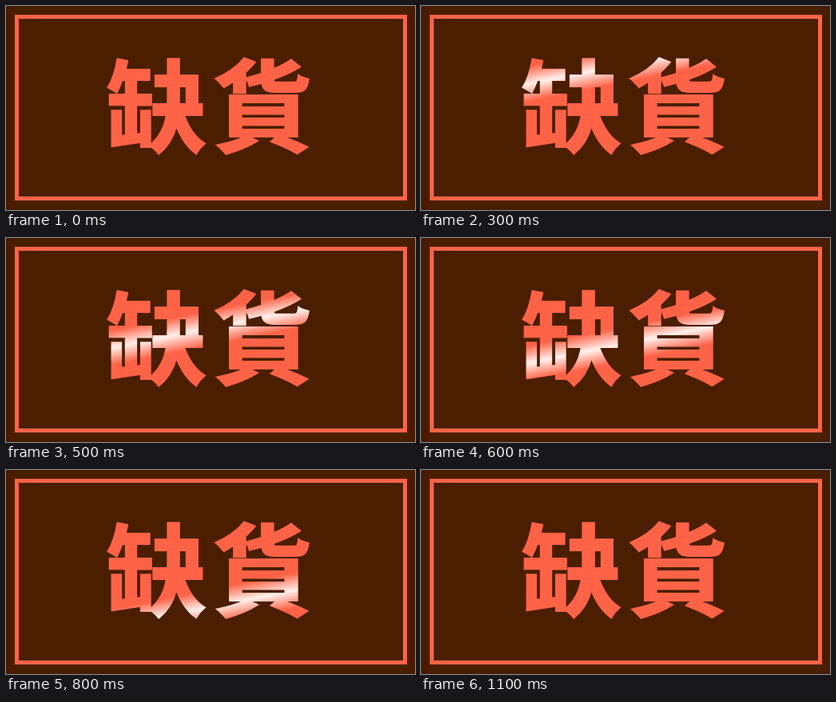
Recreate the animation shown at these times as an HTML page. Size 512 px wide and 256 px high, loop 1200 ms.

```html
<!DOCTYPE html>
<html lang="zh">
<head>
<meta charset="utf-8">
<style>
  html, body { margin: 0; width: 100%; height: 100%; overflow: hidden; background: #4b1e00; }
  svg { display: block; width: 512px; height: 256px; }
  .edge { position: absolute; top: 0; left: 0; width: 512px; height: 256px; box-shadow: inset 0 0 6px #401900; }
  text {
    font: 700 126px "Noto Sans CJK SC", "Noto Sans CJK TC", "Noto Sans CJK JP", sans-serif;
    text-anchor: middle;
    fill: url(#shine);
    stroke: url(#shine);
    stroke-width: 2px;
  }
</style>
</head>
<body>
<div class="edge"></div>
<svg viewBox="0 0 512 256">
  <defs>
    <linearGradient id="shine" gradientUnits="userSpaceOnUse" x1="-4.23" y1="-21.15" x2="4.23" y2="21.15">
      <stop offset="0" stop-color="#ff6347"/>
      <stop offset=".5" stop-color="#fff0ec"/>
      <stop offset="1" stop-color="#ff6347"/>
    </linearGradient>
  </defs>
  <rect x="13.5" y="13.5" width="486" height="228" fill="none" stroke="#ff6347" stroke-width="5"/>
  <text x="188 321.5" y="173.5">缺貨</text>
</svg>
<script>
  const LOOP = 1200, STEP = 100;
  const shine = document.getElementById('shine');
  const start = performance.now();

  // The tilted highlight slides down the lettering in discrete steps.
  function draw() {
    const time = Math.max(0, performance.now() - start) % LOOP;
    const step = Math.floor(time / STEP);
    shine.setAttribute('gradientTransform', `translate(0 ${65.6 + 19.7 * step})`);
    requestAnimationFrame(draw);
  }
  draw();
</script>
</body>
</html>
```
